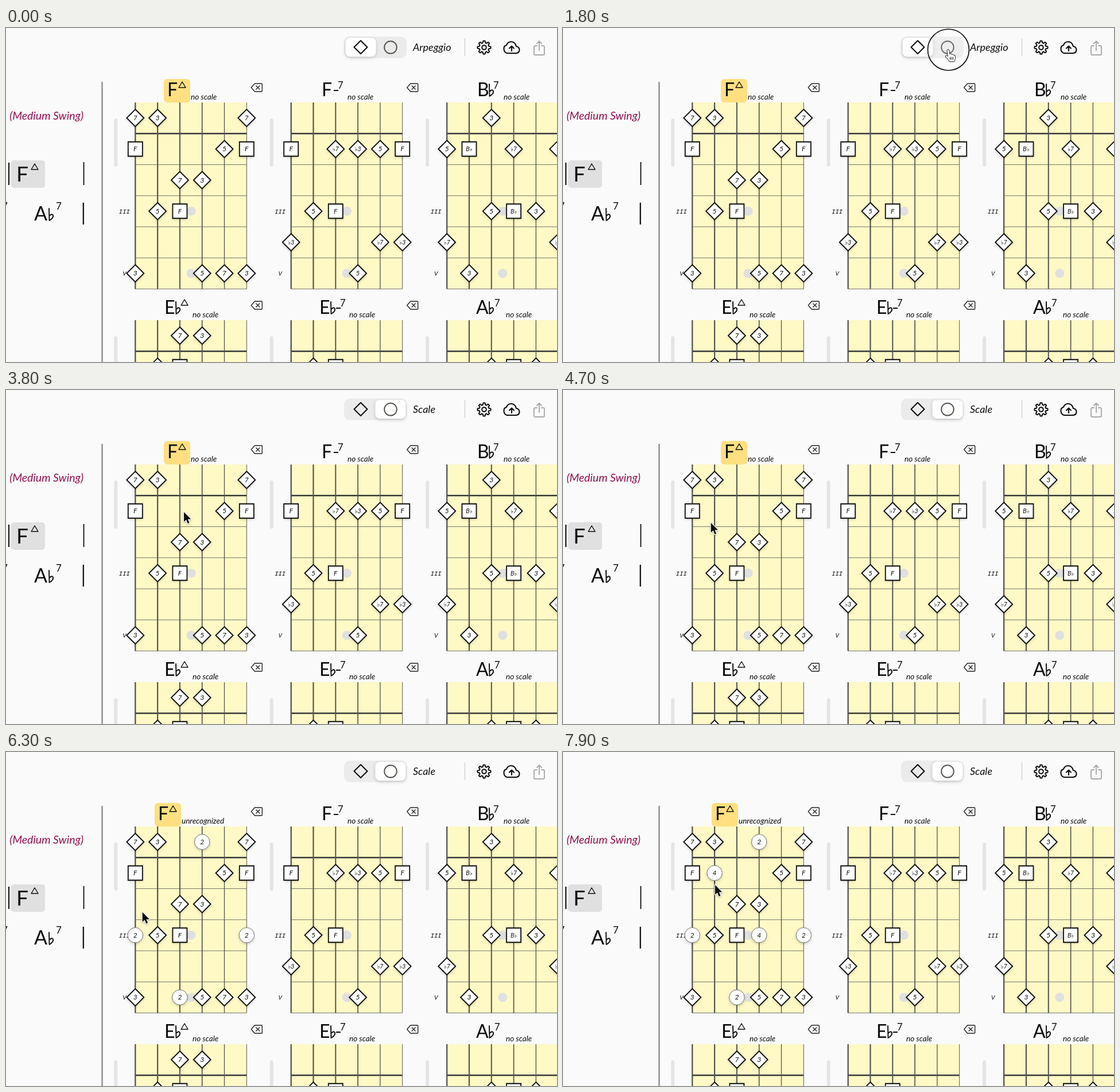
Animation of 960 by 583 pixels, one loop 8000 ms. Source, as an HTML page with a canvas:

```html
<!DOCTYPE html>
<html lang="en">
<head>
<meta charset="utf-8">
<title>Chord diagrams</title>
<style>
html, body { margin: 0; width: 100%; height: 100%; overflow: hidden; background: #fafafa; }
canvas { display: block; width: 960px; height: 583px; }
</style>
</head>
<body>
<canvas id="stage" width="960" height="583"></canvas>
<script>
const ctx = document.getElementById('stage').getContext('2d');
const LOOP = 8000, STEP = 100;
const INK = '#0c0c0c', SANS = 'Lato, "DejaVu Sans", sans-serif';
const STRING_GAP = 38.8, FRET_GAP = 54.25;
const STRING_WIDTHS = [2.3, 2.2, 2, 1.7, 1.3, 1];

// Each note: string, row, label
const parse = list => list.split(',').map(item => item.split(' '));
const panels = [
  { x: 225.3, y: 130, root: 'F', rootX: 282, maj: 300, label: 322,
    notes: parse('0 0 7,1 0 3,5 0 7,0 1 F,4 1 5,5 1 F,2 2 7,3 2 3,1 3 5,2 3 F,0 5 3,3 5 5,4 5 7,5 5 3') },
  { x: 496.7, y: 130, root: 'F', rootX: 551, minor: 571, seven: 578, label: 595,
    notes: parse('0 1 F,2 1 ♭7,3 1 ♭3,4 1 5,5 1 F,1 3 5,2 3 F,0 4 ♭3,4 4 ♭7,5 4 ♭3,3 5 5') },
  { x: 768.2, y: 130, root: 'B', rootX: 822, flat: 842, seven: 849, label: 867,
    notes: parse('2 0 3,0 1 5,1 1 B♭,3 1 ♭7,5 1 5,2 3 5,3 3 B♭,4 3 3,0 4 ♭7,5 4 ♭7,1 5 3') },
  { x: 225.3, y: 510, root: 'E', rootX: 277, flat: 296, maj: 304, label: 325,
    notes: parse('2 0 7,3 0 3,1 1 5,2 1 E♭') },
  { x: 496.7, y: 510, root: 'E', rootX: 547, flat: 566, minor: 575, seven: 582, label: 598,
    notes: parse('1 1 5,2 1 E♭') },
  { x: 768.2, y: 510, root: 'A', rootX: 820, flat: 842, seven: 851, label: 871,
    notes: parse('2 1 5,3 1 A♭,4 1 3') }
];
const seconds = parse('3 0 2,0 3 2,5 3 2,2 5 2');
const fourths = parse('1 1 4,3 3 4');

// Pointer moves: start, end, from, to, optional bend
const moves = [
  [0, 700, [-14, 495], [310, 380]],
  [900, 1600, [310, 380], [671, 38]],
  [3400, 3800, [671, 38], [310, 213]],
  [4300, 5250, [310, 213], [224, 303], [226, 225]],
  [5250, 5400, [224, 303], [225, 312]],
  [6000, 6800, [225, 312], [265, 209]],
  [7800, 7900, [265, 209], [265, 232]]
];
const clicks = [
  [1800, 2100, 671.5, 38, 36],
  [5600, 5800, 225.2, 314, 26],
  [7100, 7300, 265.2, 210, 26]
];

const clamp = v => Math.min(1, Math.max(0, v));
const ease = v => v * v * (3 - 2 * v);
const progress = (t, a, b) => ease(clamp((t - a) / (b - a)));

function text(str, x, y, size, { color = INK, style = '', align = 'left', font = SANS } = {}) {
  ctx.font = `${style} ${size}px ${font}`;
  ctx.textAlign = align;
  ctx.fillStyle = color;
  ctx.fillText(str, x, y);
}
function line(x1, y1, x2, y2, width, color) {
  ctx.beginPath();
  ctx.moveTo(x1, y1);
  ctx.lineTo(x2, y2);
  ctx.lineWidth = width;
  ctx.strokeStyle = color;
  ctx.stroke();
}
function box(x, y, w, h, r, color) {
  ctx.beginPath();
  ctx.roundRect(x, y, w, h, r);
  ctx.fillStyle = color;
  ctx.fill();
}
function disc(x, y, r, color) {
  ctx.beginPath();
  ctx.arc(x, y, r, 0, 7);
  ctx.fillStyle = color;
  ctx.fill();
}
function stroke(d, width, color = INK, x = 0, y = 0) {
  ctx.save();
  ctx.translate(x, y);
  ctx.lineWidth = width;
  ctx.strokeStyle = color;
  ctx.lineJoin = ctx.lineCap = 'round';
  ctx.stroke(new Path2D(d));
  ctx.restore();
}
function withShadow(blur, dy, color, draw) {
  ctx.save();
  ctx.shadowColor = color;
  ctx.shadowBlur = blur;
  ctx.shadowOffsetY = dy;
  draw();
  ctx.restore();
}
const triangle = (x, y) => stroke('M1 10L7 0L13 10Z', 1.4, INK, x, y);
const flatSign = (x, y) => stroke('M0 -21L.5 0Q8 -4 7 -9Q5 -13 .5 -8', 1.9, INK, x, y);

function drawNote(panel, [string, row, label], round, alpha = 1) {
  const x = panel.x + string * STRING_GAP;
  const y = panel.y + 27 + row * FRET_GAP;
  ctx.save();
  ctx.globalAlpha = alpha;
  const path = new Path2D();
  if (round) path.arc(x, y, 13.2, 0, 7);
  else if (/[A-G]/.test(label)) path.rect(x - 12.5, y - 12.5, 25, 25);
  else path.addPath(new Path2D('M0 -15L15 0L0 15L-15 0Z'), new DOMMatrix([1, 0, 0, 1, x, y]));
  ctx.fillStyle = '#fff';
  withShadow(5, 2, 'rgba(0,0,0,.22)', () => ctx.fill(path));
  ctx.lineWidth = round ? 0.9 : 1.8;
  ctx.strokeStyle = round ? '#666' : INK;
  ctx.stroke(path);
  text(label, x, y + 4.2, label.length > 1 ? 10.5 : 12, { align: 'center', style: 'italic' });
  ctx.restore();
}

function drawTitle(p, shift) {
  const base = p.y - 11;
  ctx.save();
  ctx.translate(-shift, 0);
  if (p === panels[0]) box(275, 89, 46, 41, 6, '#ffdf80');
  text(p.root, p.rootX - 1, base, 32);
  if (p.flat) flatSign(p.flat, base);
  if (p.maj) triangle(p.maj, base - 25);
  if (p.minor) line(p.minor, base - 10, p.minor + 8, base - 10, 2, INK);
  if (p.seven) text('7', p.seven, base - 13, 16.5);
  ctx.restore();
  text(shift ? 'unrecognized' : 'no scale', p.label - shift, p.y - 5, 13.5, { style: 'italic' });
}

function drawPanel(p, shift) {
  const { x, y } = p, w = STRING_GAP * 5, h = FRET_GAP * 6;
  drawTitle(p, shift);
  stroke('M0 7L6 0H18Q19 0 19 1V13Q19 14 18 14H6ZM8.5 4L14.5 10M14.5 4L8.5 10', 1.4, '#222', x + 202, y - 33);
  box(x - 37, y + 28, 6, 84, 3, '#e4e4e4');
  box(x, y, w, h, 0, '#fef9c5');
  for (const row of [3, 5]) disc(x + 97.2, y + 27 + row * FRET_GAP, 8, '#e0e0e0');
  for (let i = 1; i <= 6; i++) {
    const fy = y + i * FRET_GAP;
    line(x, fy, x + w, fy, i === 1 ? 2.6 : 1, i === 1 ? '#383838' : '#77756a');
  }
  STRING_WIDTHS.forEach((width, i) => {
    const sx = x + i * STRING_GAP;
    line(sx, y, sx, y + h, width, '#55544e');
  });
  const roman = { align: 'center', style: 'italic', font: '"Liberation Mono", monospace' };
  text('III', x - 19, y + 193.5, 10.5, roman);
  text('V', x - 19, y + 302, 10.5, roman);
  p.notes.forEach(n => drawNote(p, n));
}

function drawChart() {
  line(167.5, 94, 167.5, 583, 2.4, '#8c8c8c');
  text('(Medium Swing)', 135, 160, 19.5, { color: '#92104f', style: 'italic', align: 'right' });
  box(9, 231, 59, 48, 5, '#e0e0e0');
  line(5, 235, 5, 274, 2, INK);
  line(135.5, 234, 135.5, 274, 1.8, INK);
  line(134.8, 305, 134.8, 343, 2.2, INK);
  text('F', 18, 268, 37);
  triangle(43, 237);
  text('A', 49, 336, 34);
  flatSign(75, 336);
  text('7', 87, 317, 17);
  text('7', -7, 317, 17);
}

function drawGear() {
  ctx.beginPath();
  for (let i = 0; i < 96; i++) {
    const a = i / 96 * Math.PI * 2;
    const r = 10 + 1.6 * Math.tanh(3 * Math.cos(a * 8));
    ctx.lineTo(833 + r * Math.sin(a), 34 - r * Math.cos(a));
  }
  ctx.closePath();
  ctx.lineWidth = 2;
  ctx.strokeStyle = INK;
  ctx.stroke();
  ctx.beginPath();
  ctx.arc(833, 34, 3.8, 0, 7);
  ctx.stroke();
}

function drawToolbar(t) {
  const slide = progress(t, 2000, 2500);
  box(589, 15, 109, 37.5, 10, '#ebebeb');
  withShadow(6, 2, 'rgba(0,0,0,.18)', () => box(591.5 + 52 * slide, 17, 53, 33, 8, '#fff'));
  stroke('M618 22L629.5 33.5L618 45L606.5 33.5Z', 2);
  ctx.beginPath();
  ctx.arc(670, 33.8, 10.8, 0, 7);
  ctx.lineWidth = 2;
  ctx.stroke();
  text(t < 2100 ? 'Arpeggio' : 'Scale', 709, 40, 18, { style: 'italic' });
  line(799.5, 18, 799.5, 49, 1.4, '#d3d3d3');
  drawGear();
  stroke('M6 21H22Q28 20 27.500 14.500Q27 10 22 9Q20 1 13 1Q7 1 5 7Q0 8 0.500 14Q1 20 6 21M14 17V9M10 12.500L14 8.500L18 12.500', 2.1, INK, 867, 23);
  stroke('M6 9H3Q1 9 1 11V23Q1 25 3 25H17Q19 25 19 23V11Q19 9 17 9H14M10 17V1M6 5L10 1L14 5', 1.9, '#aaa', 919, 22);
}

function pointerAt(t) {
  const [a, b, from, to, bend] = moves.findLast(m => t >= m[0]);
  const s = progress(t, a, b);
  return from.map((v, i) => {
    const mid = bend ? bend[i] : (v + to[i]) / 2;
    return (1 - s) ** 2 * v + 2 * s * (1 - s) * mid + s * s * to[i];
  });
}

function drawPointer(t) {
  if (t < 100) return;
  const [x, y] = pointerAt(t);
  const hand = x > 589 && x < 698 && y < 53;
  const d = hand
    ? 'M-1.500 1Q0 -1 1.500 1L2.500 8Q4.500 6.500 6 8.500Q8 7.500 9 9.500Q12 9 12 12Q12.500 16 10.500 20H2.500Q0 16 -4 12.500Q-5 10 -2.500 10.500L0 12Z'
    : 'M0 0V17L4 13.500L6.500 20L9.500 18.800L6.800 12.500H12.300Z';
  const path = new Path2D(d);
  ctx.save();
  ctx.translate(x, y);
  ctx.lineJoin = 'round';
  ctx.lineWidth = hand ? 1.5 : 2.4;
  ctx.strokeStyle = hand ? INK : '#fff';
  ctx.fillStyle = hand ? '#fff' : INK;
  withShadow(3, 1, 'rgba(0,0,0,.3)', () => ctx.stroke(path));
  ctx.fill(path);
  if (hand) stroke('M3.500 13V17M6 13V17M8.500 13V17', 1);
  ctx.restore();
}

function drawClick(t) {
  for (const [from, to, x, y, r] of clicks) {
    if (t < from || t >= to) continue;
    disc(x, y, r, 'rgba(255,255,255,.15)');
    ctx.lineWidth = 1.7;
    ctx.strokeStyle = INK;
    ctx.stroke();
  }
}

function render(now) {
  const t = Math.floor(now % LOOP / STEP) * STEP;
  ctx.fillStyle = '#fafafa';
  ctx.fillRect(0, 0, 960, 583);
  drawChart();
  panels.forEach((p, i) => drawPanel(p, i === 0 && t >= 6000 ? 16 : 0));
  seconds.forEach(n => drawNote(panels[0], n, true, progress(t, 5900, 6200)));
  fourths.forEach(n => drawNote(panels[0], n, true, progress(t, 7200, 7500)));
  drawToolbar(t);
  drawClick(t);
  drawPointer(t);
}

const start = performance.now();
function tick() {
  render(performance.now() - start);
  requestAnimationFrame(tick);
}
tick();
</script>
</body>
</html>
```
